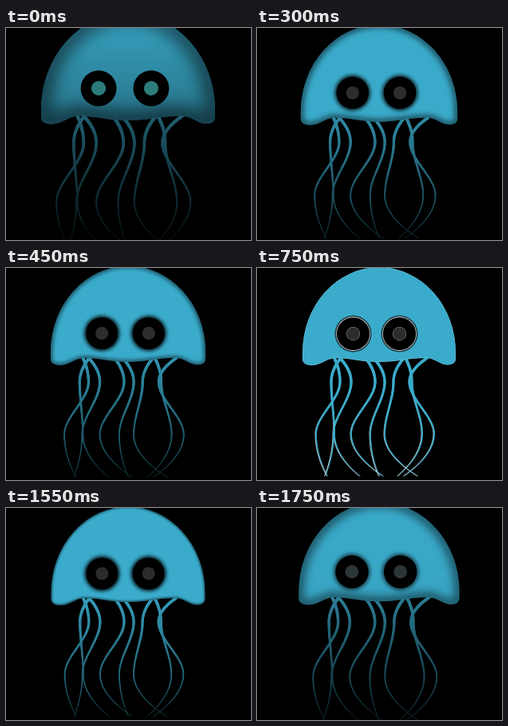
Animation, 307 px wide and 266 px high, one loop 1850 ms. Source, as an HTML page with a canvas:

```html
<!DOCTYPE html>
<html lang="en">
<head>
<meta charset="utf-8">
<title>Jellyfish</title>
<style>
html, body { margin: 0; height: 100%; overflow: hidden; background: #000; }
canvas { display: block; }
</style>
</head>
<body>
<canvas id="stage" width="307" height="266"></canvas>
<script>
const ctx = document.getElementById('stage').getContext('2d');
const LOOP = 1850;
const CENTER = { x: 153.5, y: 133 };
const EYE = { y: 82.5, left: 120.5, right: 178.5 };
const ARM = { top: 113, upper: 143, lower: 208, tip: 260 };

const bell = new Path2D(
  'M57 106 A96 107 0 0 1 249 106 V114 Q249 121 240 121.5 C229 122 224 113 211 113 ' +
  'C190 113 175 118 152 118 C132 118 116 113 98 113 C86 114 80 122 69 122 Q57 122 57 114 Z');

// Sideways position of each arm at its root, upper bend, lower bend and tip.
const arms = [
  [97, 104, 74, 88], [105, 93, 97, 128], [104, 118, 96, 86], [136, 148, 118, 157],
  [146, 160, 142, 153], [184, 171, 160, 200], [213, 191, 222, 186], [186, 194, 207, 178],
];

// How far the jellyfish is swollen: 1 is widest, 0 is at rest.
function swellAt(t) {
  const step = t < 750 ? Math.floor(t / 150)
    : t < 1550 ? 5
    : 4 - 1.5 * Math.floor((t - 1550) / 100);
  return (5 - step) / (5 + 6.4 * step);
}

const lerp = (a, b, t) => a + (b - a) * t;
const tint = k => `rgb(${58 * k}, ${171 * k}, ${203 * k})`;
const black = alpha => `rgba(0, 0, 0, ${alpha})`;

function fade(top, bottom, y0, y1) {
  const gradient = ctx.createLinearGradient(0, y0, 0, y1);
  gradient.addColorStop(0, top);
  gradient.addColorStop(1, bottom);
  return gradient;
}

function disc(x, y, r, color) {
  ctx.fillStyle = color;
  ctx.beginPath();
  ctx.arc(x, y, r, 0, 2 * Math.PI);
  ctx.fill();
}

// Arms run straight down at both bends.
function armX([root, upper, lower, tip], y) {
  if (y < ARM.upper) {
    return lerp(upper, root, ((ARM.upper - y) / (ARM.upper - ARM.top)) ** 2);
  }
  if (y > ARM.lower) {
    return lerp(lower, tip, ((y - ARM.lower) / (ARM.tip - ARM.lower)) ** 2);
  }
  const t = (y - ARM.upper) / (ARM.lower - ARM.upper);
  return lerp(upper, lower, t * t * (3 - 2 * t));
}

function strokeArm(arm, width, dx) {
  for (let y = ARM.top; y < ARM.tip; y += 2) {
    ctx.lineWidth = lerp(width, .7, (y - ARM.top) / (ARM.tip - ARM.top));
    ctx.beginPath();
    ctx.moveTo(armX(arm, y) + dx, y);
    ctx.lineTo(armX(arm, y + 2) + dx, y + 2);
    ctx.stroke();
  }
}

function drawArms(swell) {
  const dark = Math.sqrt(swell);
  ctx.lineCap = 'round';
  for (const arm of arms) {
    if (!swell) {
      ctx.strokeStyle = fade('rgba(255, 255, 255, 0)', '#fff', 150, 250);
      strokeArm(arm, 1.5, -1);
    }
    const tipTint = swell ? .45 - .4 * dark : 1;
    ctx.strokeStyle = fade(tint(1 - .45 * dark), tint(tipTint), ARM.top, ARM.tip);
    strokeArm(arm, 3.8, 0);
  }
}

function drawBell(swell) {
  ctx.fillStyle = tint(1);
  ctx.fill(bell);
  ctx.save();
  ctx.clip(bell);
  if (swell) {
    const rim = 16 * swell ** .6;
    const dim = swell ** 2;
    ctx.fillStyle = fade(black(.08 * dim), black(.32 * dim), 15, 115);
    ctx.fillRect(0, -30, 307, 170);
    ctx.filter = `blur(${rim * .6}px)`;
    ctx.strokeStyle = black(.5);
    ctx.lineWidth = rim * 1.4;
  } else {
    ctx.strokeStyle = 'rgba(255, 255, 255, .3)';
    ctx.lineWidth = 1;
  }
  ctx.stroke(bell);
  ctx.restore();
}

function drawEye(x, swell) {
  const { y } = EYE;
  const glow = 44 + 80 * swell ** 2;
  if (swell) {
    ctx.filter = 'blur(2px)';
    disc(x, y, 22, black(.9 * (1 - swell)));
    ctx.filter = 'none';
  } else {
    disc(x, y, 23, '#1d3a43');
    disc(x, y, 21.4, '#c5cfd2');
  }
  disc(x, y, swell ? 19.8 : 20.6, '#000');
  if (!swell) disc(x, y, 8.5, '#999');
  disc(x, y, 8, `rgb(44, ${glow}, ${glow})`);
}

function draw(time) {
  const swell = swellAt(time % LOOP);
  const scale = 1 + .135 * swell;
  ctx.setTransform(1, 0, 0, 1, 0, 0);
  ctx.fillStyle = '#000';
  ctx.fillRect(0, 0, 307, 266);
  ctx.translate(CENTER.x, CENTER.y);
  ctx.scale(scale, scale);
  ctx.translate(-CENTER.x, -CENTER.y);
  drawArms(swell);
  drawBell(swell);
  drawEye(EYE.left, swell);
  drawEye(EYE.right, swell);
}

const begin = performance.now();
function tick() {
  draw(performance.now() - begin);
  requestAnimationFrame(tick);
}
tick();
</script>
</body>
</html>
```
